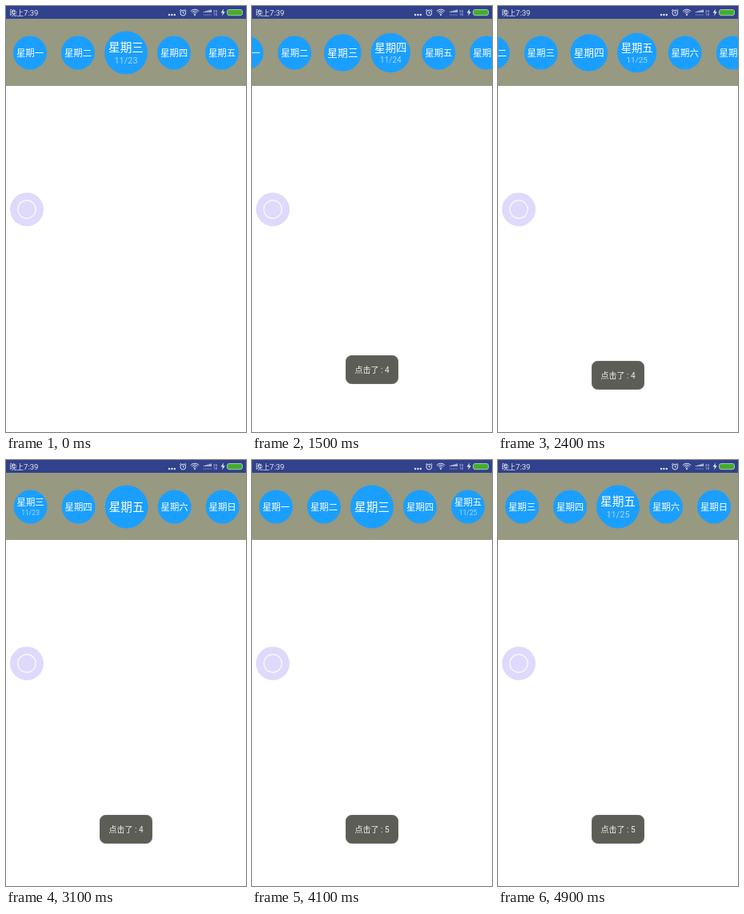
An HTML page with a canvas that plays this animation: 300 by 533 pixels, repeating every 5000 ms.

```html
<!DOCTYPE html>
<html lang="zh-CN">
<head>
<meta charset="utf-8">
<style>
  html, body { margin: 0; width: 100%; height: 100%; overflow: hidden; background: #fff; }
  canvas { display: block; width: 300px; height: 533px; }
</style>
</head>
<body>
<canvas id="stage"></canvas>
<script>
const W = 300, H = 533, LOOP = 5000, STEP = 100;
const CJK = '"Noto Sans CJK SC", "Noto Sans CJK", sans-serif';
const LATIN = 'Roboto, sans-serif';
const MIXED = 'Roboto, ' + CJK;
const DAYS = [...'一二三四五六日'];
const FIRST_DATE = 21;
const SCROLL_TIME = 700;

// Each tap selects a day and scrolls the strip to it.
const taps = [
  { at: 0, day: 2, from: 0, to: 0 },
  { at: 1100, day: 3, from: 0, to: 60 },
  { at: 2000, day: 4, from: 60, to: 119.4 },
  { at: 3100, day: 2, from: 119.4, to: 0 },
  { at: 4100, day: 4, from: 0, to: 120 }
];
const toasts = [
  { at: 1400, end: 3400, rise: 22, label: '点击了 : 4' },
  { at: 3400, end: 5400, rise: 32, label: '点击了 : 5' }
];

const canvas = document.getElementById('stage');
const ratio = window.devicePixelRatio || 1;
canvas.width = W * ratio;
canvas.height = H * ratio;
const ctx = canvas.getContext('2d');
ctx.scale(ratio, ratio);

const clamp = v => Math.min(1, Math.max(0, v));
const ease = u => (1 - Math.cos(Math.PI * clamp(u))) / 2;

function rect(x, y, w, h, color) {
  ctx.fillStyle = color;
  ctx.fillRect(x, y, w, h);
}

function roundRect(x, y, w, h, r, fill, stroke) {
  ctx.beginPath();
  ctx.roundRect(x, y, w, h, r);
  ctx.fillStyle = fill;
  ctx.fill();
  if (stroke) {
    ctx.strokeStyle = stroke;
    ctx.stroke();
  }
}

function disc(x, y, r, color) {
  ctx.beginPath();
  ctx.arc(x, y, r, 0, Math.PI * 2);
  ctx.fillStyle = color;
  ctx.fill();
}

function arc(x, y, r, a, b) {
  ctx.beginPath();
  ctx.arc(x, y, r, a, b);
  ctx.stroke();
}

function line(...points) {
  ctx.beginPath();
  points.forEach(([x, y]) => ctx.lineTo(x, y));
  ctx.stroke();
}

function text(str, x, y, size, family, color, align = 'center') {
  ctx.font = `${size}px ${family}`;
  ctx.textAlign = align;
  ctx.fillStyle = color;
  ctx.fillText(str, x, y);
}

function drawStatusBar() {
  const ink = '#e4e7f2';
  rect(0, 0, W, 16, '#31418b');
  text('晚上', 4.5, 12, 8.8, CJK, ink, 'left');
  text('7:39', 22, 12, 9.6, LATIN, ink, 'left');
  for (let i = 0; i < 3; i++) disc(204 + i * 3.4, 11, 1.2, ink);

  ctx.strokeStyle = ink;
  ctx.lineWidth = 1;
  arc(221.3, 8.6, 3.4, 0, Math.PI * 2);
  line([221.3, 6.6], [221.3, 8.9], [222.8, 8.9]);
  line([217.2, 5.8], [219, 4.2]);
  line([223.6, 4.2], [225.4, 5.8]);

  for (const r of [2.6, 4.7, 6.8]) arc(236, 11, r, -Math.PI * 0.78, -Math.PI * 0.22);
  disc(236, 11, 1.1, ink);

  for (let i = 0; i < 5; i++) {
    const h = 1 + i * 0.6;
    rect(247 + i * 2.1, 8 - h, 1.4, h, ink);
    rect(247 + i * 2.1, 10.5, 1.2, 1, '#9ca6ce');
  }
  text('2G', 261.7, 7.8, 4.2, LATIN, ink);
  text('1X', 261.7, 12, 4.2, LATIN, ink);

  ctx.beginPath();
  [[272, 3.6], [268.6, 8.6], [271, 8.6], [270, 12.6], [273.8, 7.2], [271.5, 7.2]]
    .forEach(([x, y]) => ctx.lineTo(x, y));
  ctx.fillStyle = ink;
  ctx.fill();
  roundRect(276.5, 4.5, 19, 7.2, 2.5, '#45ad2b', '#a9c4b5');
}

function drawDay(day, x, selected) {
  const y = 58.5;
  const near = 1 - clamp(Math.abs(x - 150) / 60);
  const radius = 21 + 6 * near;
  const scale = radius / 21;
  disc(x, y, radius, '#1b9fff');
  ctx.save();
  ctx.translate(x, y);
  ctx.scale(scale, scale);
  text('星期' + DAYS[day], 0, selected ? -1.5 : 4.3, 11.4, CJK, '#fff');
  if (selected) text('11/' + (FIRST_DATE + day), 0, 10.8, 8.5, LATIN, '#a6d7fc');
  ctx.restore();
}

function drawStrip(t) {
  const tap = taps.filter(a => a.at <= t).pop();
  const scroll = tap.from + (tap.to - tap.from) * ease((t - tap.at) / SCROLL_TIME);
  rect(0, 16, W, 84, '#979981');
  DAYS.forEach((_, day) => drawDay(day, 30 + day * 60 - scroll, day === tap.day));
}

function drawTouchBall() {
  disc(26, 254.5, 21, '#dfd9fc');
  ctx.strokeStyle = '#f8f6ff';
  ctx.lineWidth = 1.4;
  arc(26, 254.5, 11.2, 0, Math.PI * 2);
}

function drawToast(t) {
  const toast = toasts.find(a => t >= a.at && t < a.end);
  if (!toast) return;
  const age = (t - toast.at) / 1000;
  // Damped spring around the resting place.
  const offset = toast.rise * Math.exp(-5.2 * age) * Math.cos(age * Math.PI * 2 / 0.3);
  ctx.save();
  ctx.globalAlpha = Math.min(clamp(0.5 + age * 5), clamp((toast.end - t) / 200));
  ctx.translate(0, Math.round(offset));
  ctx.lineWidth = 1;
  roundRect(117.5, 444.5, 65, 35, 7, '#5b5d56', '#666a5c');
  text(toast.label, 150, 466, 10, MIXED, '#f0f0ec');
  ctx.restore();
}

function draw(t) {
  rect(0, 0, W, H, '#fff');
  drawStrip(t);
  drawStatusBar();
  drawTouchBall();
  drawToast(t);
}

let start;
function tick(now) {
  start ??= now;
  const t = Math.max(0, now - start) % LOOP;
  draw(Math.floor(t / STEP) * STEP);
  requestAnimationFrame(tick);
}
draw(0);
requestAnimationFrame(tick);
</script>
</body>
</html>
```
